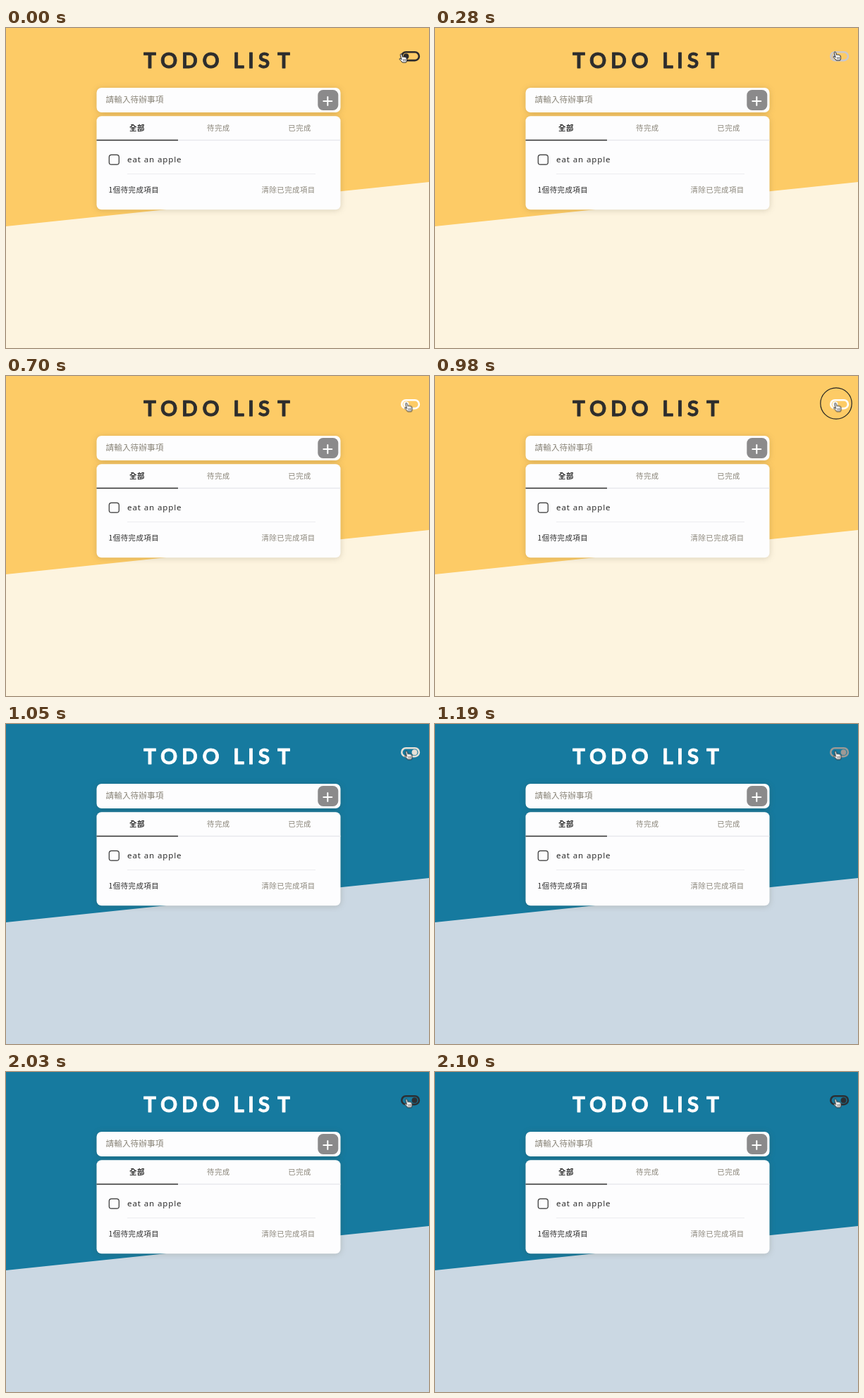
An HTML page that plays this animation: 600 px wide and 455 px high, repeating every 2.73 s.

```html
<!DOCTYPE html>
<html lang="zh-Hant">
<head>
<meta charset="utf-8">
<title>Todo list</title>
<style>
  html, body { margin: 0; width: 100%; height: 100%; overflow: hidden; }
  svg { display: block; width: 600px; height: 455px; }
  text { font-family: "Noto Sans CJK TC", "Noto Sans CJK", sans-serif; font-size: 10.4px; letter-spacing: .5px; fill: #2d2d2d; }
  .title { font: 700 30px Lato, sans-serif; letter-spacing: 0; text-anchor: middle; stroke-width: .8; stroke-linejoin: round; }
  .field { font-size: 11.7px; letter-spacing: 0; }
  .task { font: 500 11.5px "Noto Sans", sans-serif; letter-spacing: .9px; }
  .muted { fill: #8a8579; }
  .active { font-weight: 700; }
  .card { fill: #fdfdfe; filter: drop-shadow(0 1px 4px rgba(70, 60, 30, .2)); }

  .top, .base, .title, .toggle, .knob, .hand, .ring { animation: 2730ms infinite step-end; }
  .top { animation-name: top; }
  .base { animation-name: base; }
  .title { animation-name: title; }
  .knob { animation-name: knob; }
  .toggle { animation-name: toggle; }
  .hand { animation-name: hand; }
  .ring { animation-name: ring; transform-origin: 569px 39px; }

  /* theme switches at 1050 ms */
  @keyframes top { 0% { fill: #fdcb66; } 38.46%, 100% { fill: #167a9f; } }
  @keyframes base { 0% { fill: #fdf4df; } 38.46%, 100% { fill: #cbd8e3; } }
  @keyframes title { 0% { fill: #2d2d2d; stroke: #2d2d2d; } 38.46%, 100% { fill: #fff; stroke: #fff; } }
  @keyframes knob { 0% { transform: none; } 38.46%, 100% { transform: translateX(12px); } }
  @keyframes toggle {
    0% { color: #2c2b2c; }
    2.56% { color: #2c2b2c; animation-timing-function: steps(3); }
    10.25% { color: #cbc8cc; animation-timing-function: steps(2); }
    15.38% { color: #fff; }
    38.46% { color: #e6e0d6; animation-timing-function: steps(5); }
    51.27%, 100% { color: #2c2f33; }
  }
  @keyframes hand {
    0% { transform: translate(557px, 36px); animation-timing-function: steps(4); }
    10.25% { transform: translate(564px, 33px); animation-timing-function: steps(4); }
    20.5%, 100% { transform: translate(564.5px, 37.5px); }
  }
  @keyframes ring {
    0% { opacity: 0; transform: scale(.65); }
    33.3% { opacity: 1; transform: scale(.65); }
    35.89% { opacity: 1; transform: none; }
    38.46%, 100% { opacity: 0; transform: none; }
  }
</style>
</head>
<body>
<svg viewBox="0 0 600 455">
  <rect class="base" width="600" height="455"/>
  <path class="top" d="M0 0H600V219L0 282Z"/>

  <text class="title" y="56.5" x="204 231 260.5 290.5 330 347.5 366 394">TODOLIST</text>

  <rect class="card" x="128.5" y="85" width="346" height="35" rx="7"/>
  <text class="field muted" x="141.5" y="106">請輸入待辦事項</text>
  <rect x="442.3" y="88" width="29" height="29" rx="7.5" fill="#8b8a8b"/>
  <path d="M450.3 104H462.3M456.3 98V110" stroke="#fff" stroke-width="2" stroke-linecap="round"/>

  <rect class="card" x="128.5" y="125.3" width="346" height="133" rx="7"/>
  <text class="active" x="175" y="146">全部</text>
  <text class="muted" x="285" y="146">待完成</text>
  <text class="muted" x="400.3" y="146">已完成</text>
  <path d="M244 159.5H474.5" stroke="#e7e8ec" stroke-width="1.4"/>
  <path d="M128.5 159.5H244" stroke="#2d2d2d" stroke-width="1.5"/>

  <rect x="146.3" y="180.3" width="14" height="13.8" rx="3.2" fill="none" stroke="#333" stroke-width="1.2"/>
  <text class="task" x="172" y="191">eat an apple</text>
  <path d="M172 207.5H439" stroke="#ececef"/>
  <text x="145.5" y="234">1個待完成項目</text>
  <text class="muted" x="362.5" y="234">清除已完成項目</text>

  <g class="toggle">
    <rect x="561.3" y="34.3" width="24.6" height="11.8" rx="5.9" fill="none" stroke="currentColor" stroke-width="2.6"/>
    <circle class="knob" cx="567.5" cy="40.2" r="3.9" fill="currentColor"/>
  </g>
  <circle class="ring" cx="569" cy="39" r="22.2" fill="none" stroke="#222" stroke-width="1.2"/>
  <g class="hand" stroke="#222" stroke-linejoin="round" stroke-linecap="round">
    <path d="M3.9 8.6L2.3 2.5Q2.1 1 3.2 .9Q4.2 .8 4.6 2.2L5.5 5.3Q6.3 4.4 7.3 5.3Q8.3 4.6 9.2 5.6Q10.8 5.2 11.2 7L11.5 9.4Q11.5 11 10.6 13H5.2Q4.1 11 1.3 8.8Q.6 7.8 1.6 7.3Q2.6 7.2 3.9 8.6Z" fill="#fff" stroke-width="1"/>
    <path d="M6.3 8.6L6.6 11M8 8.4L8.2 11M9.6 8.3V10.8" fill="none" stroke-width=".6"/>
  </g>
</svg>
</body>
</html>
```
